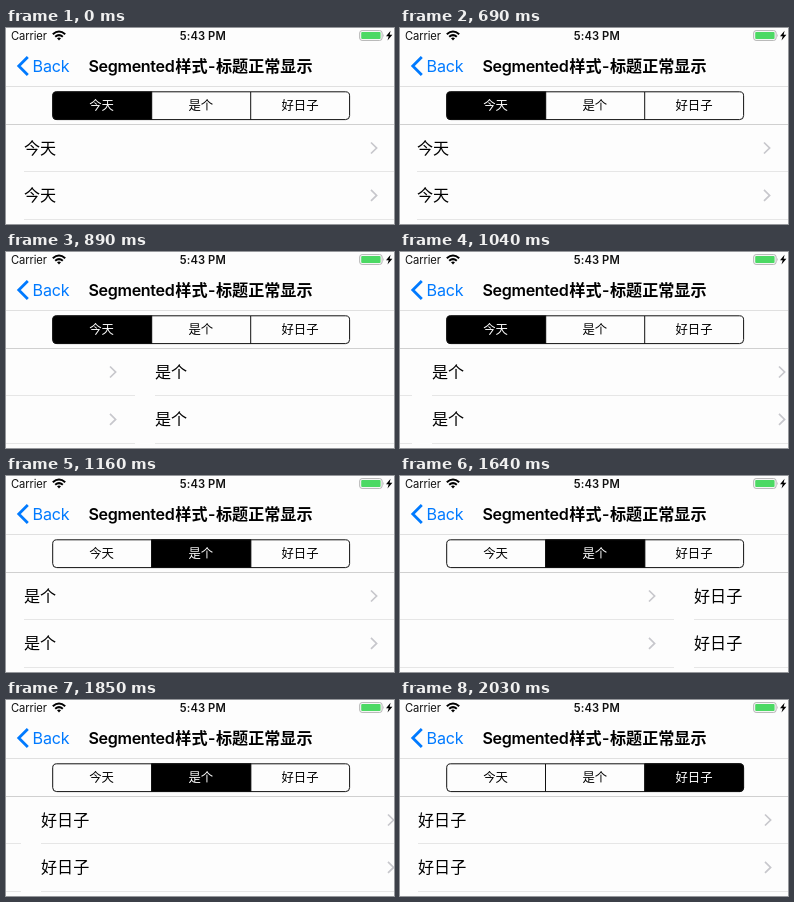
An HTML page that plays this animation: 388 px wide and 196 px high, repeating every 2990 ms.

```html
<!DOCTYPE html>
<html lang="zh-CN">
<head>
<meta charset="utf-8">
<title>Segmented</title>
<style>
html, body { margin: 0; width: 100%; height: 100%; overflow: hidden; background: #fdfdfd; }
svg { display: block; width: 388px; height: 196px; font-family: Inter, "Noto Sans CJK SC", "Noto Sans CJK", sans-serif; }
.status { font-size: 11.2px; fill: #111; }
.title { font-size: 16.1px; font-weight: 600; }
.back { font-size: 16.1px; fill: #007aff; }
.cjk { font-family: "Noto Sans CJK SC", "Noto Sans CJK", sans-serif; }
.title.cjk { font-weight: 700; }
.seg { font-size: 12.4px; text-anchor: middle; }
.cell { font-size: 16.1px; }
</style>
</head>
<body>
<svg viewBox="0 0 388 196">
  <defs><clipPath id="pill"><rect x="46.2" y="63.3" width="297.9" height="28.8" rx="4.5"/></clipPath></defs>
  <rect width="388" height="196" fill="#fdfdfd"/>
  <g id="list"></g>
  <rect width="388" height="96" fill="#fdfdfd"/>
  <path d="M0 58.5H388" stroke="#e0e0e0"/>
  <path d="M0 96.5H388" stroke="#d0d0d0"/>

  <text class="status" x="5" y="12" letter-spacing="-.1">Carrier</text>
  <g fill="none" stroke="#000" stroke-width="2">
    <path d="M46.8 6.3Q53 .8 59.2 6.3M49.2 8.8Q53 5.5 56.8 8.8"/>
    <path d="M51 10.2Q53 8.6 55 10.2L53 12.4Z" fill="#000" stroke="none"/>
  </g>
  <text class="status" x="196.8" y="12.2" text-anchor="middle" font-weight="600" letter-spacing=".1">5:43 PM</text>
  <rect x="353.7" y="2.6" width="22.4" height="9.8" rx="2.4" fill="none" stroke="#b2b2b2"/>
  <rect x="355.2" y="4" width="19.4" height="7" rx="1" fill="#4cd964"/>
  <path d="M377.2 5.8q1.4 1.7 0 3.4z" fill="#b2b2b2"/>
  <path d="M384.6 2.8L380 8.2h2.7l-1.2 4.2L386.4 6.8h-2.8z"/>

  <path d="M21.8 29L12.8 38L21.8 47" fill="none" stroke="#007aff" stroke-width="2.8"/>
  <text class="back" x="26.5" y="43.6" letter-spacing="-.15">Back</text>
  <text class="title" x="82.5" y="43.6" letter-spacing="-.35">Segmented</text>
  <text class="title cjk" x="169.3" y="43.8">样式</text>
  <text class="title" x="202" y="43.6">-</text>
  <text class="title cjk" x="210" y="43.8">标题正常显示</text>

  <g id="tabs" clip-path="url(#pill)"></g>
  <rect x="46.7" y="63.8" width="296.9" height="27.8" rx="4" fill="none" stroke="#111"/>
  <path d="M145.5 64V91.5M244.7 64V91.5" stroke="#111"/>
</svg>
<script>
const LOOP = 2990, PAGE = 392;
const names = ['今天', '是个', '好日子'];
const picks = [0, 1160, 2030];

// [ms, scroll offset]: a drag, then the spring to the next page
const scroll = [
  [0, 0], [690, 1], [750, 30], [800, 92], [830, 150], [860, 208], [890, 261],
  [920, 306], [970, 350], [1030, 378], [1100, 389], [1160, 392],
  [1640, 508], [1700, 608], [1730, 664], [1790, 735], [1850, 767],
  [1910, 778], [1970, 782], [2030, 784]
];

const list = document.getElementById('list');
const tabs = document.getElementById('tabs');

function add(parent, tag, attrs, text) {
  const el = document.createElementNS('http://www.w3.org/2000/svg', tag);
  for (const key in attrs) el.setAttribute(key, attrs[key]);
  if (text) el.textContent = text;
  return parent.appendChild(el);
}

function play(el, steps, toFrame) {
  const frames = steps.map(([ms, v]) => ({ offset: ms / LOOP, easing: 'step-end', ...toFrame(v) }));
  frames.push({ offset: 1, ...toFrame(steps[steps.length - 1][1]) });
  el.animate(frames, { duration: LOOP, iterations: Infinity }).startTime = 0;
}

names.forEach((name, i) => {
  const x = i * PAGE;
  for (const y of [120, 167.4]) {
    add(list, 'text', { class: 'cell cjk', x: x + 18, y: y + 6 }, name);
    add(list, 'path', {
      d: `M${x + 365} ${y - 5.5}l5.6 5.5l-5.6 5.5`,
      fill: 'none', stroke: '#c7c7cc', 'stroke-width': 1.7
    });
    add(list, 'path', { d: `M${x + 18} ${Math.round(y + 23.4) + .5}H${x + 390}`, stroke: '#e6e6e6' });
  }

  const left = 46 + i * 99.2;
  const fill = add(tabs, 'rect', { x: left, y: 63, width: 100, height: 30 });
  const label = add(tabs, 'text', { class: 'seg cjk', x: left + 49.6, y: 82.2 }, name);
  const steps = picks.map((ms, k) => [ms, k === i]);
  play(fill, steps, on => ({ opacity: on ? 1 : 0 }));
  play(label, steps, on => ({ fill: on ? '#fff' : '#000' }));
});

play(list, scroll, v => ({ transform: `translateX(${-v}px)` }));
</script>
</body>
</html>
```
